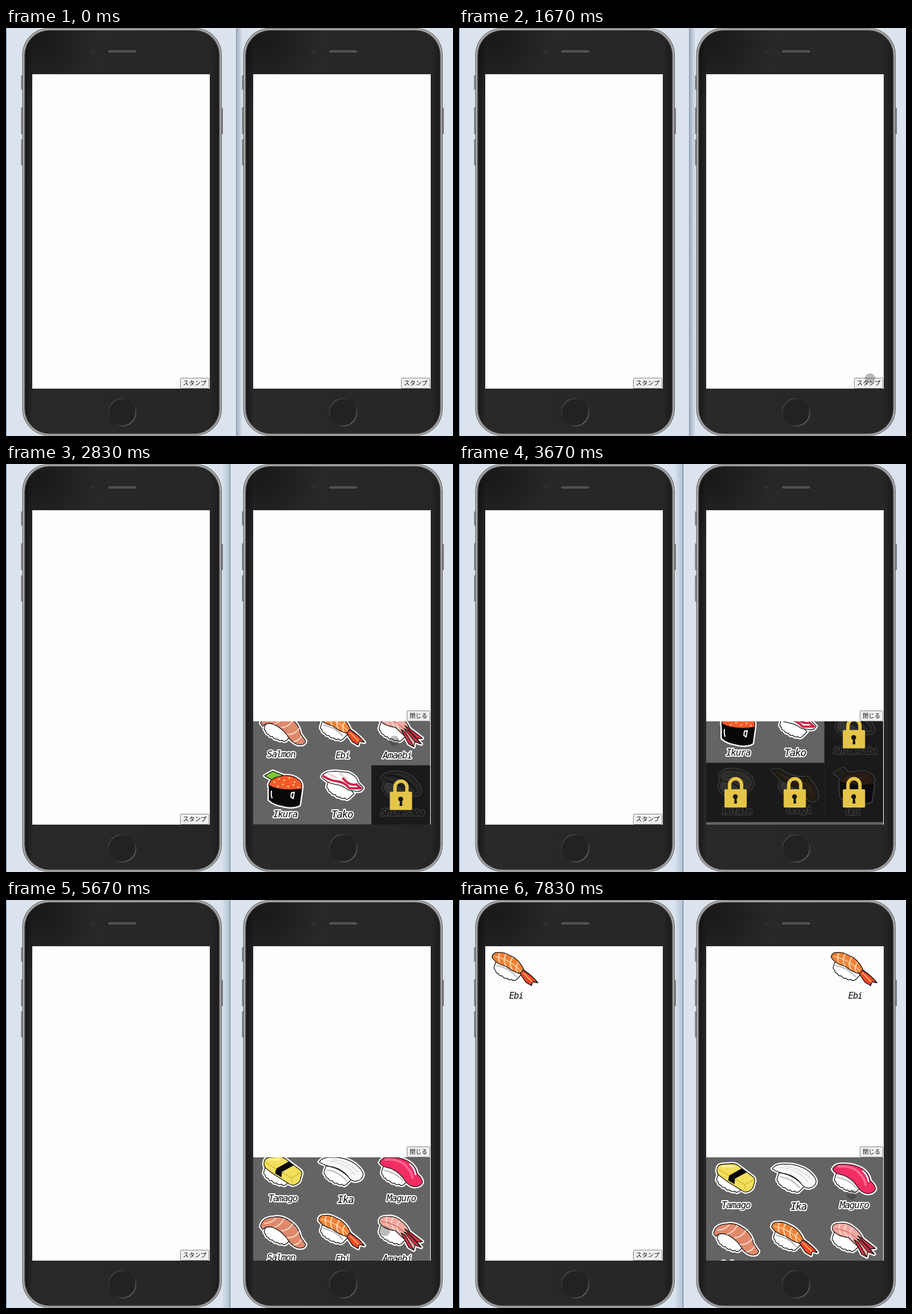
An HTML page that plays this animation: 783 px wide and 715 px high, repeating every 8 s.

```html
<!DOCTYPE html>
<html lang="ja">
<head>
<meta charset="utf-8">
<title>Sushi stamps</title>
<style>
  html, body { margin: 0; width: 100%; height: 100%; overflow: hidden; background: #dae3ee; }
  svg { display: block; }
  .label { font-family: "DejaVu Sans Mono", monospace; font-style: italic; letter-spacing: -1.2px; text-anchor: middle;
    fill: #0c0c0c; stroke: #fff; stroke-width: 4px; stroke-linejoin: round; paint-order: stroke; }
  .button rect { fill: #efefef; stroke: #858585; }
  .button text { font: 10.4px "Noto Sans CJK JP", "Noto Sans CJK", sans-serif; text-anchor: middle; fill: #111; }
</style>
</head>
<body>
<svg id="stage" width="783" height="715" viewBox="0 0 783 715"></svg>
<script>
const CELL = 311 / 3;
const STEPS = 48, STEP_RATE = 6 / 1000;
const FOCUS = 11, OPEN = 12, SENT = 38, REOPEN = 45, TOUCH = 7;

const riceAt = (x = 0, y = 0) => [
  `M${24 + x} ${26 + y}l-3 9q-2 5 2 7q0 5 5 6q2 5 7 4q3 6 8 4q4 5 8 2q4 4 8 1L${68 + x} ${50 + y}Q${48 + x} ${28 + y} ${24 + x} ${26 + y}Z`,
  '#fff'];
const underside = (x = 0, y = 0) =>
  [`M${26 + x} ${33 + y}Q${46 + x} ${36 + y} ${60 + x} ${52 + y}`, '#bbb', 2.2];

// Each piece: name, label x, label baseline, label size, filled shapes, stroked details.
const pieces = [
  ['Tamago', 52, 89, 16,
    [riceAt(-2, 1), ['M19 21Q20 13 28 12L46 11Q52 11 57 15L82 34Q86 37 85 42L82 53Q79 59 69 61L64 59L38 43L22 31Q18 27 19 21Z', '#f3df5b'],
      ['M62 20L70 26L50 37L49 46L39 40L41 32Z', '#090909']],
    [['M22 21L40 32M51 38L67 48L69 58M67 48L83 39', '#cfae2c', 1.2], ['M28 16H47', '#fff3a2', 3]]],
  ['Ika', 58, 92, 17.5,
    [riceAt(0, 1), ['M12 20Q18 11 34 12Q58 11 76 24Q88 34 89 42Q88 52 76 54Q67 54 62 45Q52 33 36 29Q22 27 12 20Z', '#f8f8f8']],
    [['M24 18Q54 18 74 42M36 16Q62 18 80 38', '#ccc', 1.2], underside(0, 1)]],
  ['Maguro', 52, 89, 16,
    [riceAt(-3, 1), ['M14 21Q18 11 32 12Q50 11 66 20Q78 28 80 41Q90 50 89 56Q85 65 72 63Q62 60 56 49Q46 36 32 31Q18 29 14 21Z', '#f22d63']],
    [['M24 16Q50 14 62 29Q70 37 72 48', '#ff6790', 4], ['M67 24Q75 30 77 42', '#fff', 2.5], underside(-4, 2)]],
  ['Salmon', 49, 89, 15.5,
    [riceAt(-1, 1), ['M13 30Q15 14 36 13Q50 10 64 20Q80 30 83 48L92 61Q90 69 78 67Q66 63 59 50Q48 36 34 31Q23 28 17 35Z', '#df886c']],
    [['M20 24Q32 24 40 15M37 31Q49 27 54 16M50 37Q63 36 69 25M60 49Q73 50 80 39M71 62Q80 60 84 53', '#fbd9c5', 2]]],
  ['Ebi', 53, 91, 15.5,
    [riceAt(-6, -1), ['M11 19Q11 10 21 10Q32 9 42 15Q55 20 63 33L67 41Q82 51 91 63L82 61L80 68L70 62L60 47Q47 44 35 34Q18 30 11 19Z', '#f28135'],
      ['M65 41Q82 51 91 63L82 61L80 68L70 62L60 47Z', '#f14a27']],
    [['M24 12Q21 20 24 27M35 13Q29 24 35 33M47 19Q39 30 46 39M57 28Q50 36 55 44', '#ffe5c5', 1.8],
      ['M16 17Q42 22 62 43', '#ffd2a4', 1.5], ['M66 46L81 61', '#ffae64', 2], underside(-7, 0)]],
  ['Amaebi', 45, 91, 16,
    [riceAt(-7, 1), ['M14 23Q12 12 26 12Q40 10 52 20Q62 27 67 39L89 56L80 57L87 66L76 62L74 71L62 56L42 37Q20 34 14 23Z', '#f3a9a0'],
      ['M58 34L67 39L89 56L80 57Z', '#d93043'], ['M57 39L64 42L87 66L76 62Z', '#d93043'], ['M52 41L59 45L74 71L65 66Z', '#d93043']],
    [['M27 13Q23 21 29 31M38 14Q31 24 40 35M49 20Q40 29 48 40', '#ffe0d9', 1.7],
      ['M18 21Q42 24 56 39', '#c95e60', 1.1]]],
  ['Ikura', 56, 91, 16,
    [['M20 18L34 10L52 17L39 29Z', '#7bc83a'], ['M27 34Q30 22 47 19Q70 14 83 28Q88 37 82 46H29Z', '#f7592b'],
      ['M28 35Q48 46 85 41L81 69Q70 75 54 71Q36 68 28 60Z', '#080808']],
    [['M37 29h.1m8-5h.1m9 2h.1m9-4h.1m9 7h.1M43 37h.1m9-4h.1m9 4h.1m9-3h.1m8 4h.1', '#ffd478', 3],
      ['M32 45Q31 52 33 57M67 48L72 47L70 58L66 55Z', '#fff', 2]]],
  ['Tako', 52, 92, 17.5,
    [riceAt(5, -1), ['M16 20Q20 10 40 10L62 12Q78 18 80 30L89 39Q86 47 76 45L63 43Q51 34 40 33Q24 30 16 20Z', '#fff']],
    [['M20 19Q32 27 45 28Q57 30 65 40L85 40L77 33Q64 36 54 23', '#ca2447', 4], ['M29 15L42 21M48 14L61 24', '#ead0cb', 3]]],
  ['Shimesaba', 54, 88, 16,
    [riceAt(0, 2), ['M18 23Q24 10 46 12Q74 14 86 43Q87 53 74 52Q59 35 38 31Z', '#a9b3ba']],
    [['M28 18Q58 16 78 44', '#4a5359', 4]], true],
  ['Hotate', 54, 90, 16,
    [riceAt(2, 4), ['M23 22Q31 8 50 12Q77 14 82 34Q80 50 66 48Q48 33 28 32Z', '#eee2cf']],
    [['M33 18Q54 19 66 37M48 16L74 34', '#b8a78d', 2]], true],
  ['Unagi', 59, 88, 16,
    [riceAt(4, 3), ['M12 13Q19 7 34 18Q55 28 72 25Q89 38 92 59Q87 70 75 63Q68 46 46 40Q30 32 12 13Z', '#a8703f']],
    [['M28 20Q48 35 70 35L84 55', '#dcad66', 3]], true],
  ['Uni', 50, 91, 16,
    [['M18 18L33 9L46 23L35 31Z', '#6e9948'], ['M27 32Q34 17 54 17Q78 11 87 29L80 43H29Z', '#c96a37'],
      ['M27 32Q49 42 86 37L82 67Q68 73 54 69Q36 67 28 58Z', '#080808']],
    [['M36 28L50 23L61 28L76 21', '#f2ae58', 3]], true],
];

const path = (d, fill, stroke, width) =>
  `<path d="${d}" fill="${fill}" stroke="${stroke}" stroke-width="${width}" stroke-linejoin="round" stroke-linecap="round"/>`;

const lock = `<path d="M41 48V38a10.5 10.5 0 0 1 21 0V48" fill="none" stroke="#e5c548" stroke-width="6"/>
  <rect x="32" y="46" width="39" height="32" rx="2" fill="#e5c548"/>
  <circle cx="51" cy="59" r="4.3" fill="#151515"/><path d="M50 60h3l1 11h-5z" fill="#151515"/>`;

function sticker([name, x, y, size, shapes, details, locked]) {
  const art = shapes.map(([d]) => path(d, '#fff', '#fff', 6)).join('')
    + shapes.map(([d, fill]) => path(d, fill, '#171717', 1.3)).join('')
    + details.map(([d, color, width]) => path(d, 'none', color, width)).join('')
    + `<text class="label" x="${x}" y="${y}" font-size="${size}">${name}</text>`;
  if (!locked) return art;
  return `${art}<rect width="${CELL}" height="${CELL}" fill="#0c0c0d" opacity=".84"/>
    <path d="M0 ${CELL}V0H${CELL}" fill="none" stroke="#22222c"/>${lock}`;
}

const menu = pieces.map((piece, i) =>
  `<g transform="translate(${i % 3 * CELL} ${Math.floor(i / 3) * CELL})">${sticker(piece)}</g>`).join('');

const button = (x, y, width, text, id = '') => `<g class="button"${id && ` id="${id}"`}>
  <rect x="${x + .5}" y="${y + .5}" width="${width - 1}" height="18" rx="1"/>
  <text x="${x + width / 2}" y="${y + 13}">${text}</text></g>`;

const block = (x, y, w, h, fill, rx = 0) =>
  `<rect x="${x}" y="${y}" width="${w}" height="${h}" rx="${rx}" fill="${fill}"/>`;

const phone = x => `<g transform="translate(${x})">
  ${[[83, 25], [139, 47], [195, 46]].map(([y, h]) => block(26.5, y, 4, h, '#77777b', 1)).join('')}
  ${block(376, 140, 4, 46, '#77777b', 1)}
  ${block(28.5, 0, 349.5, 714.5, '#69696a', 47)}
  ${block(29.7, 1, 347, 712.5, '#adadad', 46)}
  ${block(32, 3.5, 342.5, 708, '#555', 44)}
  ${block(33.5, 4.5, 339.5, 706, 'url(#body)', 43)}
  ${block(33.5, 4.5, 339.5, 706, 'url(#corner)', 43)}
  <circle cx="152" cy="41" r="3.5" fill="#171717" stroke="#404040"/><circle cx="152" cy="41" r="1.3" fill="#5c5c66"/>
  ${block(177.5, 37.5, 52, 7, '#191919', 3.5)}${block(178.5, 38.5, 50, 5, '#505050', 2.5)}
  <circle cx="203.5" cy="673.5" r="24" fill="#222" stroke="url(#ring)" stroke-width="1.8"/>
  ${block(46, 81, 311, 551, '#fdfdfd')}
</g>`;

document.getElementById('stage').innerHTML = `
<defs>
  <linearGradient id="body"><stop stop-color="#181818"/><stop offset=".04" stop-color="#292929"/>
    <stop offset=".96" stop-color="#262626"/><stop offset="1" stop-color="#1b1b1b"/></linearGradient>
  <radialGradient id="corner" gradientUnits="userSpaceOnUse" cx="60" cy="25" r="105">
    <stop stop-color="#000" stop-opacity=".4"/><stop offset="1" stop-color="#000" stop-opacity="0"/></radialGradient>
  <linearGradient id="ring" x2="1" y2="1"><stop stop-color="#565656"/><stop offset=".4" stop-color="#242424"/>
    <stop offset=".6" stop-color="#282828"/><stop offset="1" stop-color="#858585"/></linearGradient>
  <linearGradient id="shade"><stop stop-color="#9ba9bd"/><stop offset="1" stop-color="#dae3ee"/></linearGradient>
  <linearGradient id="shadeLeft"><stop stop-color="#dae3ee"/><stop offset="1" stop-color="#b1c1d2"/></linearGradient>
</defs>
${block(0, 0, 783, 715, '#dae3ee')}${block(0, 0, 1, 715, '#4386b7')}
<g id="backEdge">${block(403, 0, 11, 715, 'url(#shade)')}${block(403, 0, 1, 715, '#8391a3')}</g>
<g id="frontEdge">${block(378, 0, 14, 715, 'url(#shadeLeft)')}${block(392, 0, 1, 715, '#57758b')}</g>
${phone(0)}${phone(387)}
${button(305, 613, 51, 'スタンプ')}
${button(692, 613, 51, 'スタンプ', 'openButton')}
<g id="sent">
  <g transform="translate(47 82)">${sticker(pieces[4])}</g>
  <g transform="translate(641 82)">${sticker(pieces[4])}</g>
</g>
<g id="panel">
  ${button(702, 432, 41, '閉じる')}
  <svg x="433" y="451" width="310" height="181" overflow="hidden">
    ${block(0, 0, 310, 181, '#646464')}<g id="menu">${menu}</g>
  </svg>
</g>
<circle id="touch" r="9" fill="#202020" opacity=".3"/>`;

const scrollKeys = [[12, 0], [14, 46], [17, 130], [20, 218], [22, 238], [26, 238], [30, 120], [34, 12], [35, 0]];
const touchKeys = [[7, 748, 560], [10, 720, 614], [11, 719, 619], [12, 688, 610], [14, 683, 568], [17, 680, 485],
  [18, 684, 585], [22, 660, 475], [26, 672, 482], [30, 675, 595], [34, 664, 580], [37, 592, 590],
  [38, 592, 590], [43, 710, 620], [44, 712, 621], [47, 688, 516]];

function sample(keys, step, index) {
  const next = keys.findIndex(key => key[0] >= step);
  if (next < 0) return keys[keys.length - 1][index];
  if (next === 0) return keys[0][index];
  const a = keys[next - 1], b = keys[next];
  return a[index] + (b[index] - a[index]) * (step - a[0]) / (b[0] - a[0]);
}

const el = id => document.getElementById(id);
const show = (id, visible) => el(id).setAttribute('display', visible ? 'inline' : 'none');

function draw(ms) {
  // The small offset absorbs rounded frame delays.
  const step = Math.floor((ms + 5) * STEP_RATE) % STEPS;
  const open = step >= OPEN && step < SENT || step >= REOPEN;
  show('backEdge', step < FOCUS);
  show('frontEdge', step >= FOCUS);
  show('panel', open);
  show('openButton', !open);
  show('sent', step >= SENT);
  show('touch', step >= TOUCH);
  el('menu').setAttribute('transform', `translate(0 ${-sample(scrollKeys, step, 1)})`);
  el('touch').setAttribute('cx', sample(touchKeys, step, 1));
  el('touch').setAttribute('cy', sample(touchKeys, step, 2));
}

const start = performance.now();
function tick() {
  draw(performance.now() - start);
  requestAnimationFrame(tick);
}
tick();
</script>
</body>
</html>
```
